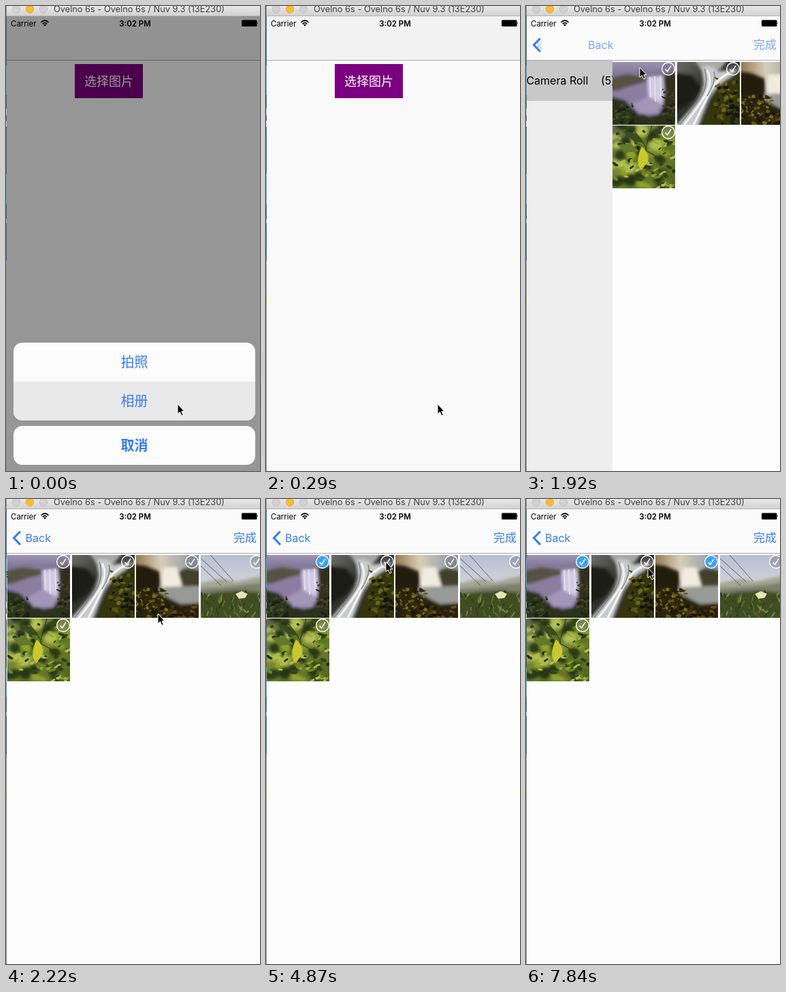
An HTML page that plays this animation: 373x681 px, repeating every 7.99 s.

```html
<!DOCTYPE html>
<html lang="zh">
<head>
<meta charset="utf-8">
<title>Photo picker</title>
<style>
  html, body { margin: 0; width: 100%; height: 100%; overflow: hidden; background: #fff; }
  svg { display: block; width: 373px; height: 681px; }
  text { font-family: Inter, "Noto Sans CJK SC", "Noto Sans CJK", sans-serif; }
  .blue { fill: #357bfb; }
  .chevron { fill: none; stroke: #357bfb; stroke-width: 3; }
  .mid { text-anchor: middle; }
</style>
</head>
<body>
<svg viewBox="0 0 373 681">
  <defs>
    <linearGradient id="bar" x2="0" y2="1"><stop stop-color="#e9e8e9"/><stop offset="1" stop-color="#d3d2d3"/></linearGradient>
    <clipPath id="screen"><rect x="1" y="15" width="372" height="666"/></clipPath>
    <clipPath id="label"><rect x="17" y="40" width="300" height="38"/></clipPath>
    <clipPath id="tile"><rect width="92" height="92"/></clipPath>
    <filter id="haze" x="-10%" y="-10%" width="120%" height="120%"><feGaussianBlur stdDeviation="2.2"/></filter>
    <filter id="soft" x="-5%" y="-5%" width="110%" height="110%"><feGaussianBlur stdDeviation=".7"/></filter>
    <linearGradient id="sky0" x2="0" y2="1"><stop stop-color="#a79cba"/><stop offset=".2" stop-color="#83799a"/><stop offset=".8" stop-color="#7d7090"/></linearGradient>
    <linearGradient id="sky1" x2="1" y2="1"><stop stop-color="#74746e"/><stop offset=".4" stop-color="#33342d"/><stop offset="1" stop-color="#191b12"/></linearGradient>
    <linearGradient id="sky2"><stop stop-color="#8a6f45"/><stop offset=".4" stop-color="#d9cdb8"/><stop offset="1" stop-color="#7d8da3"/></linearGradient>
    <linearGradient id="sky3" x2="0" y2="1"><stop stop-color="#b5bed1"/><stop offset=".5" stop-color="#d2d5da"/></linearGradient>
    <linearGradient id="sky4" x2="1" y2="1"><stop stop-color="#5d6450"/><stop offset=".5" stop-color="#7d8a33"/><stop offset="1" stop-color="#4a5c1a"/></linearGradient>
  </defs>
  <rect width="1" height="681" fill="#8d8d8d"/>
  <g id="desktop"></g>

  <g clip-path="url(#screen)">
    <g id="home">
      <rect x="1" y="79" width="372" height="602" fill="#f9f9f9"/>
      <rect x="101" y="85" width="100" height="50" fill="#7b007f"/>
      <text class="mid" x="151" y="117" font-size="18" fill="#fff">选择图片</text>
    </g>
    <rect id="homeDim" x="1" y="79" width="372" height="602"/>
    <g id="albums">
      <rect x="1" y="79" width="372" height="602" fill="#fff"/>
      <rect id="row" x="1" y="80" width="372" height="59" fill="#d6d6d6"/>
      <g id="thumb" transform="translate(14 82) scale(.587)"></g>
      <text x="78.500" y="115" font-size="16">Camera Roll</text>
      <text x="188" y="115" font-size="16">(5)</text>
    </g>
    <rect id="albumsDim" x="1" y="79" width="372" height="602"/>
    <g id="photos">
      <rect x="1" y="79" width="372" height="602" fill="#fdfdfd"/>
    </g>

    <rect id="nav" x="1" y="15" width="372" height="64"/>
    <rect x="1" y="79" width="372" height="1" fill="#a9a9ab"/>
    <path id="chevron" class="chevron" d="M21 47.500 11.500 57 21 67"/>
    <g clip-path="url(#label)" font-size="16">
      <text id="oldBack" class="blue" x="28" y="63">Back</text>
      <text id="back" class="blue" x="28" y="63">Back</text>
    </g>
    <text id="done" class="blue" x="334" y="63" font-size="17">完成</text>

    <text x="7" y="29.500" font-size="11.500">Carrier</text>
    <path fill="none" stroke="#000" stroke-width="1.700" d="M51.500 24Q57 18.500 62.500 24M53.800 26.300Q57 23 60.200 26.300"/>
    <path d="M55 27.500Q57 25.800 59 27.500L57 29.800Z"/>
    <text class="mid" x="189.500" y="29.500" font-size="11.500" font-weight="600">3:02 PM</text>
    <rect x="346" y="20.500" width="22.500" height="9.500" rx="1.500"/>
    <path d="M369 23.300q1.500 1.900 0 3.800z"/>

    <rect id="shade" x="1" y="15" width="372" height="666"/>
    <g id="sheet" class="blue mid" font-size="20">
      <rect x="11" y="493" width="355" height="114" rx="13" fill="#fcfcfc"/>
      <path d="M11 550H366V594a13 13 0 0 1-13 13H24a13 13 0 0 1-13-13Z" fill="#e9e9e9"/>
      <rect x="11" y="615" width="355" height="57" rx="13" fill="#fcfcfc"/>
      <text x="188.500" y="529">拍照</text>
      <text x="188.500" y="586">相册</text>
      <text x="188.500" y="651" font-weight="600">取消</text>
    </g>
  </g>

  <rect x="1" width="372" height="14" fill="url(#bar)"/>
  <rect x="1" y="14" width="372" height="1" fill="#b7b6b7"/>
  <g stroke-width=".8">
    <circle cx="15" cy="4.500" r="5.700" fill="#d3d1d3" stroke="#b9b7b9"/>
    <circle cx="35" cy="4.500" r="5.700" fill="#fdbd2e" stroke="#dfa023"/>
    <circle cx="55" cy="4.500" r="5.700" fill="#d3d1d3" stroke="#b9b7b9"/>
  </g>
  <text x="70" y="9" font-size="12.800" fill="#3d3d3d">Ovelno 6s - Ovelno 6s / Nuv 9.3 (13E230)</text>

  <path id="cursor" d="M0 0V14.500L3.400 11.500 5.800 17 8.200 16 5.800 10.700H10Z" stroke="#fff" stroke-width="1"/>
</svg>
<script>
const $ = id => document.getElementById(id);
const WIDTH = 372, LOOP = 7990, STEPS = 54;

let seed = 7;
const random = () => (seed = seed * 16807 % 2147483647) / 2147483647;
const shape = (fill, d) => `<path fill="${fill}" d="${d}"/>`;
const line = (color, width, d) => `<path fill="none" stroke="${color}" stroke-width="${width}" d="${d}"/>`;
const haze = (...parts) => `<g filter="url(#haze)">${parts.join('')}</g>`;

// Seeded foliage inside a box.
function scatter(count, colors, [x, y, w, h], rx, ry) {
  let out = '';
  for (let i = 0; i < count; i++) {
    const cx = x + random() * w, cy = y + random() * h, turn = random() * 90 - 45;
    out += `<ellipse rx="${rx * (.5 + random())}" ry="${ry * (.5 + random())}" fill="${colors[i % colors.length]}"
      transform="translate(${cx} ${cy}) rotate(${turn})"/>`;
  }
  return out;
}

const scenes = [
  () => haze(
    shape('#57513f', 'M-5 24 22 18 48 22 97 15V42H-5Z'),
    shape('#8a7da0', 'M-5 46 30 34 52 28 54 80 20 72Z'),
    shape('#302f1e', 'M77 20 97 16V97H60L74 66Z'),
    shape('#2a311b', 'M-5 50 18 56 32 70 54 80 97 70V97H-5Z'),
    shape('#d3cbe4', 'M51 22 74 20 76 44 73 66 54 66Z'),
    shape('#a396b8', 'M30 62 52 50 74 62 66 76 38 76Z'))
    + line('#e9e4f2', 1.5, 'M55 22 56 52M62 21 63 58M70 20 71 52')
    + scatter(45, ['#39441f', '#1b2013', '#444b25'], [0, 58, 32, 34], 2.5, 1.5)
    + scatter(35, ['#3a4020', '#212012', '#4a462b'], [74, 40, 18, 52], 2.5, 1.5),
  () => haze(
    shape('#a9a9a4', 'M24 -5H76L62 12 38 16Z'),
    shape('#1b1c17', 'M-5 16 22 20 36 38 22 58 -5 74Z'),
    shape('#35350f', 'M60 24 97 8V97H34L46 68Z'),
    shape('#c9cacb', 'M36 8Q50 2 60 14L90 10 78 22Q56 34 46 56L30 97H-5L24 64Q42 42 38 24Z'))
    + scatter(60, ['#57530f', '#14150b', '#37370f', '#6b671b', '#1d1e12'], [56, 24, 36, 66], 3.5, 2.2)
    + line('#f4f4f4', 3, 'M44 12Q54 30 38 54T10 92M84 13Q58 22 47 46L24 92')
    + line('#7f8284', 1.5, 'M40 10Q48 34 32 56L4 92M54 14Q58 28 44 50'),
  () => haze(
    shape('#241b0e', 'M-5 14 14 16 34 24 38 50 -5 58Z'),
    shape('#42402c', 'M60 26 74 19 97 24V48H60Z'),
    shape('#f1ebe0', 'M40 18 60 18 68 46 36 47Z'),
    shape('#989a97', 'M34 47 97 45V72H44Z'),
    shape('#2a210c', 'M-5 48 24 46 36 56 50 64 66 72 97 70V97H-5Z'))
    + scatter(75, ['#5c5a14', '#1e190b', '#77711c', '#362b0e'], [0, 50, 46, 42], 3, 2)
    + scatter(40, ['#17130b', '#6b4913', '#3d3614', '#221b0d'], [36, 74, 56, 18], 3, 1.8),
  () => haze(
    shape('#a4a594', 'M-5 42 30 35 52 39 97 29V68H-5Z'),
    shape('#7b806b', 'M-5 50 44 46 97 40V66H-5Z'),
    shape('#3f4d22', 'M-5 58 28 54 58 52 97 56V97H-5Z'))
    + line('#45474d', .8, 'M0 5 38 39M0 16 30 45M14 0 48 38')
    + scatter(90, ['#557032', '#2b3b16', '#768c4c', '#5c4630', '#3a4d1e'], [0, 56, 92, 36], 1, 5)
    + shape('#e7e6ba', 'M51 57 60 53 69 57 65 63 56 64Z'),
  () => haze(scatter(60, ['#8fa32c', '#2c3a14', '#b3c052', '#5c7420', '#273416'], [0, 0, 92, 92], 9, 6))
    + scatter(70, ['#94a834', '#31421a', '#6c8426', '#222f14', '#aebb50'], [0, 8, 92, 84], 4, 2)
    + shape('#3a4a20', 'M16 8 34 12 46 25 32 24Z')
    + shape('#62782a', 'M8 28 28 27 37 38 18 40Z')
    + line('#374113', 1.2, 'M24 0Q45 21 50 35L42 66M58 0 48 36 75 51')
    + shape('#c9c62f', 'M43 31Q54 39 52 53L42 66Q32 52 43 31Z')
];

function photo(index) {
  return `<g clip-path="url(#tile)"><g filter="url(#soft)"><rect x="-5" y="-5" width="102" height="102" fill="url(#sky${index})"/>${scenes[index]()}</g></g>`;
}

const pictures = scenes.map((_, i) => photo(i));
$('thumb').innerHTML = pictures[0] + '<rect width="92" height="92" opacity=".3"/>';
$('photos').innerHTML += pictures.map((picture, i) => {
  const x = 1 + Math.round(i % 4 * 94.6), y = 82 + (i > 3) * 93;
  return `<g transform="translate(${x} ${y})">${picture}
    <circle class="badge" cx="82" cy="10" r="9.300" stroke="#fff" stroke-width="1.400"/>
    ${line('#fff', 1.4, 'M77.500 10.500 80.500 14 86 5.500')}</g>`;
}).join('');
const badges = document.querySelectorAll('.badge');

$('desktop').innerHTML = [[15, 373, '#3f5f98'], [87, 130, '#47a9d0'], [150, 160, '#b9b2c0'],
  [168, 177, '#d5c5cd'], [246, 290, '#47a9d0'], [312, 318, '#a8acb8'], [427, 437, '#949b13']]
  .map(([top, end, fill]) => `<rect y="${top}" width="1" height="${end - top}" fill="${fill}"/>`).join('');

// Pointer stops: step, x, y.
const path = [[0, 252, 583], [4, 252, 583], [6, 175, 430], [9, 167, 94], [13, 167, 90], [15, 223, 168],
  [19, 171, 104], [20, 160, 102], [23, 80, 90], [24, 80, 90], [26, 171, 100], [27, 171, 100],
  [30, 258, 97], [33, 176, 92], [35, 176, 92], [39, 271, 92], [41, 273, 87], [44, 272, 86],
  [48, 177, 91], [52, 177, 91], [53, 179, 101]];

function pointer(step) {
  const i = Math.max(1, path.findIndex(p => p[0] >= step));
  const [s0, x0, y0] = path[i - 1], [s1, x1, y1] = path[i];
  const k = (step - s0) / (s1 - s0);
  return [x0 + (x1 - x0) * k, y0 + (y1 - y0) * k];
}

// Fraction of a push transition still to travel.
function remaining(step, start) {
  const left = step < start ? 1 : Math.exp(-2.35 * (step - start));
  return left < .0015 ? 0 : left;
}

const set = (id, name, value) => $(id).setAttribute(name, value);
const slide = (id, x, y = 0) => set(id, 'transform', `translate(${x} ${y})`);

function draw(time) {
  // Steps land on 10 ms ticks, up to 15 ms early.
  const step = Math.min(STEPS - 1, Math.floor((time + 15) * STEPS / LOOP));
  const first = remaining(step, 3.95), second = remaining(step, 12.54);
  const inPhotos = second < 1;
  const current = inPhotos ? second : first;

  slide('home', -112 * (1 - first));
  slide('albums', WIDTH * first - 78 / .66 * (1 - second));
  slide('photos', Math.round(WIDTH * second));
  set('homeDim', 'opacity', .1 * (1 - first));
  set('albumsDim', 'opacity', .1 * (1 - second));
  set('row', 'opacity', step >= 12 ? 1 : 0);

  set('nav', 'fill', first < 1 ? '#fbfbfb' : '#f2f2f2');
  set('chevron', 'opacity', 1 - first);
  slide('back', 186 * current);
  set('back', 'opacity', 1 - current);
  slide('oldBack', -62 * (1 - second));
  set('oldBack', 'opacity', inPhotos ? second : 0);
  set('done', 'opacity', 1 - second);

  const sheet = [1, .5][step] || 0;
  set('shade', 'opacity', .4 * sheet);
  slide('sheet', 0, 190 * (1 - sheet));

  const picked = [step >= 23, step >= 34 && step < 49, step >= 42];
  badges.forEach((badge, i) => badge.setAttribute('fill', picked[i] ? '#3ca2f4' : 'rgba(115,115,120,.4)'));
  slide('cursor', ...pointer(step));
}

function tick() {
  draw(performance.now() % LOOP);
  requestAnimationFrame(tick);
}
tick();
</script>
</body>
</html>
```
